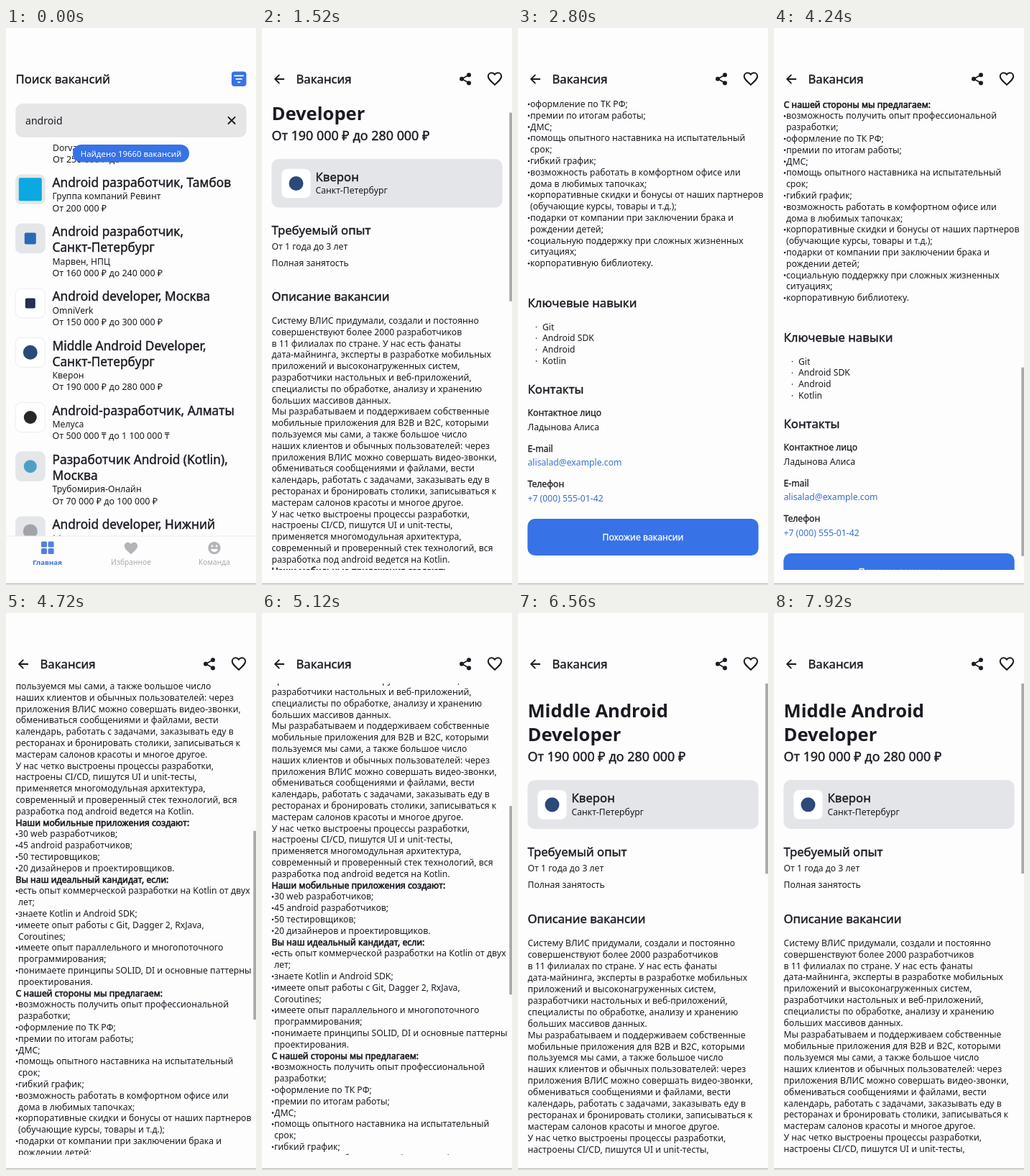
An HTML page for the animation above (8 s loop, 348x774 px).

```html
<!DOCTYPE html>
<html lang="ru">
<head>
<meta charset="utf-8">
<title>Поиск вакансий</title>
<style>
  html, body { margin: 0; width: 100%; height: 100%; overflow: hidden; background: #fdfdfd; }
  svg { display: block; width: 100vw; height: 100vh; }
  text { font: 400 12.2px "Noto Sans", "Open Sans", sans-serif; fill: #1a1b22; white-space: pre; }
  /* a thin outline gives the medium weight */
  .h, .pay, .label, .strong { stroke: #1a1b22; stroke-width: .4px; }
  .h { font-size: 16.7px; }
  .item { font-size: 17.3px; }
  .title { font-size: 25.6px; font-weight: 600; }
  .pay { font-size: 17.9px; }
  .sum { font-size: 12.5px; }
  .label { stroke-width: .3px; }
  .strong { stroke-width: .6px; }
  .link { fill: #3a6fd2; }
  .query { font-size: 14.1px; }
  .toast { font-size: 11.4px; fill: #fff; }
  .button { fill: #fff; stroke: #fff; stroke-width: .3px; }
  .tab { font-size: 10.2px; fill: #a9abb0; }
  .tab.on { font-size: 9.6px; font-weight: 600; fill: #3772e7; }
  .mid { text-anchor: middle; }
</style>
</head>
<body>
<svg id="stage" viewBox="0 0 348 774"></svg>
<script>
const INK = '#1a1b22', BLUE = '#3772e7', PAPER = '#fdfdfd', GREY = '#b4b5b9';
const LOOP = 8000, STEP = 80;
const TOP = 98, VIEW = 655, MAX_SCROLL = 982, LINE = 15.8;

const text = (x, y, str, cls = '') => `<text x="${x}" y="${y}" class="${cls}">${str}</text>`;
const box = (x, y, w, h, r, fill, extra = '') =>
  `<rect x="${x}" y="${y}" width="${w}" height="${h}" rx="${r}" fill="${fill}" ${extra}/>`;
const dot = (x, y, r, fill) => `<circle cx="${x}" cy="${y}" r="${r}" fill="${fill}"/>`;
const stroke = (d, width, color = INK) =>
  `<path d="${d}" fill="none" stroke="${color}" stroke-width="${width}"/>`;
const heart = (x, y, attrs) => `<path transform="translate(${x} ${y})" ${attrs}
  d="M0 8.3C-6 3-9.2.2-9.2-3.3C-9.2-6.2-7-8.3-4.4-8.3C-2.6-8.3-1-7.4 0-6C1-7.4 2.6-8.3 4.4-8.3C7-8.3 9.2-6.2 9.2-3.3C9.2.2 6 3 0 8.3Z"/>`;

// Vacancy list: tile colour, mark shape, mark colour, mark size, title lines, company, salary
const rows = [
  ['#e5e6ea', 'square', '#0ba9df', 32, ['Android разработчик, Тамбов'], 'Группа компаний Ревинт', 'От 200 000 ₽'],
  ['#e5e6ea', 'square', '#2b69b5', 16, ['Android разработчик,', 'Санкт-Петербург'], 'Марвен, НПЦ', 'От 160 000 ₽ до 240 000 ₽'],
  ['#fff', 'square', '#252f52', 14, ['Android developer, Москва'], 'OmniVerk', 'От 150 000 ₽ до 300 000 ₽'],
  ['#fff', 'circle', '#2b4a78', 20, ['Middle Android Developer,', 'Санкт-Петербург'], 'Кверон', 'От 190 000 ₽ до 280 000 ₽'],
  ['#fff', 'circle', '#26272b', 18, ['Android-разработчик, Алматы'], 'Мелуса', 'От 500 000 ₸ до 1 100 000 ₸'],
  ['#e5e6ea', 'circle', '#4f9fc4', 18, ['Разработчик Android (Kotlin),', 'Москва'], 'Трубомирия-Онлайн', 'От 70 000 ₽ до 100 000 ₽'],
  ['#e5e6ea', 'circle', '#a2a3a7', 20, ['Android developer, Нижний', 'Новгород'], '', '']
];

function tile(x, y, fill, shape, color, size) {
  const inset = 20.5 - size / 2;
  return box(x, y, 41, 41, 8, fill, 'stroke="#e6e7ea" stroke-width=".8"') +
    box(x + inset, y + inset, size, size, shape === 'circle' ? size / 2 : 2, color);
}

function vacancyList() {
  let y = 221, out = text(65, 170.5, 'Dorva') + text(65, 186.5, 'От 250 000 ₽ до', 'sum');
  for (const [fill, shape, color, size, lines, company, pay] of rows) {
    out += tile(13.3, y - 17.3, fill, shape, color, size);
    lines.forEach((line, i) => out += text(64.5, y + i * 22, line, 'h item'));
    const end = y + (lines.length - 1) * 22;
    out += text(64.5, end + 17.3, company) + text(64.5, end + 33.5, pay, 'sum');
    y = end + 68.2;
  }
  return out;
}

function tabs() {
  const grid = [[49, 713.5], [58.6, 713.5], [49, 723], [58.6, 723]]
    .map(([x, y]) => box(x, y, 8, 8, 1.5, '#527fdf')).join('');
  const smile = dot(290, 722.5, 8.7, GREY) + dot(287, 720, 1.4, PAPER) + dot(293, 720, 1.4, PAPER) +
    `<path d="M285 724H295C294 729.5 286 729.5 285 724Z" fill="${PAPER}"/>`;
  return box(0, 706, 348, 66, 0, PAPER) + box(0, 705.5, 348, 1, 0, '#ebecee') + grid +
    heart(174, 723, `fill="${GREY}"`) + smile +
    text(57.5, 746, 'Главная', 'tab on mid') + text(174, 746, 'Избранное', 'tab mid') +
    text(290, 746, 'Команда', 'tab mid');
}

const searchScreen = () =>
  text(13.5, 77, 'Поиск вакансий', 'h') + box(314, 60.5, 20.5, 20.5, 4, BLUE) +
  stroke('M317.5 66.3H331M319.8 70.8H328.7M322.3 75.3H326.2', 1.8, '#fff') +
  `<g clip-path="url(#listArea)">${vacancyList()}</g>` +
  box(13.3, 105, 321.4, 47, 10, '#e6e6e7') + text(27, 133.5, 'android', 'query') +
  stroke('M309 123.3L319.2 133.5M319.2 123.3L309 133.5', 1.9) +
  box(93, 162, 162, 24.5, 12, BLUE) + text(174, 178.7, 'Найдено 19660 вакансий', 'toast mid') +
  tabs();

// Leading mark: "*" bold line, "•" list item, "_" continuation of an item
const description = `Систему ВЛИС придумали, создали и постоянно
совершенствуют более 2000 разработчиков
в 11 филиалах по стране. У нас есть фанаты
дата-майнинга, эксперты в разработке мобильных
приложений и высоконагруженных систем,
разработчики настольных и веб-приложений,
специалисты по обработке, анализу и хранению
больших массивов данных.
Мы разрабатываем и поддерживаем собственные
мобильные приложения для B2B и B2C, которыми
пользуемся мы сами, а также большое число
наших клиентов и обычных пользователей: через
приложения ВЛИС можно совершать видео-звонки,
обмениваться сообщениями и файлами, вести
календарь, работать с задачами, заказывать еду в
ресторанах и бронировать столики, записываться к
мастерам салонов красоты и многое другое.
У нас четко выстроены процессы разработки,
настроены CI/CD, пишутся UI и unit-тесты,
применяется многомодульная архитектура,
современный и проверенный стек технологий, вся
разработка под android ведется на Kotlin.
*Наши мобильные приложения создают:
•30 web разработчиков;
•45 android разработчиков;
•50 тестировщиков;
•20 дизайнеров и проектировщиков.
*Вы наш идеальный кандидат, если:
•есть опыт коммерческой разработки на Kotlin от двух
_лет;
•знаете Kotlin и Android SDK;
•имеете опыт работы с Git, Dagger 2, RxJava,
_Coroutines;
•имеете опыт параллельного и многопоточного
_программирования;
•понимаете принципы SOLID, DI и основные паттерны
_проектирования.
*С нашей стороны мы предлагаем:
•возможность получить опыт профессиональной
_разработки;
•оформление по ТК РФ;
•премии по итогам работы;
•ДМС;
•помощь опытного наставника на испытательный
_срок;
•гибкий график;
•возможность работать в комфортном офисе или
_дома в любимых тапочках;
•корпоративные скидки и бонусы от наших партнеров
_(обучающие курсы, товары и т.д.);
•подарки от компании при заключении брака и
_рождении детей;
•социальную поддержку при сложных жизненных
_ситуациях;
•корпоративную библиотеку.`.split('\n');

function descriptionLine(line, i) {
  const y = 460 + i * LINE;
  if (line[0] === '*') return text(13.5, y, line.slice(1), 'strong');
  if (line[0] === '_') return text(17, y, line.slice(1));
  if (line[0] === '•') return dot(15, y - 4, 1.3, INK) + text(17, y, line.slice(1));
  return text(13.5, y, line);
}

const skill = (name, i) => dot(25.5, 1397.5 + i * LINE, .8, INK) + text(34, 1401.5 + i * LINE, name);

const vacancy = () =>
  text(13.5, 144.3, 'Middle Android', 'title') + text(13.5, 177, 'Developer', 'title') +
  text(13.5, 205.3, 'От 190 000 ₽ до 280 000 ₽', 'pay') +
  box(13.3, 231, 321.4, 67.5, 10, '#e4e5e9') + tile(27, 244.5, '#fff', 'circle', '#2b4a78', 20) +
  text(74.5, 262, 'Кверон', 'h') + text(74.5, 279.3, 'Санкт-Петербург') +
  text(13.5, 336, 'Требуемый опыт', 'h') + text(13.5, 357.2, 'От 1 года до 3 лет') +
  text(13.5, 380, 'Полная занятость') + text(13.5, 428.3, 'Описание вакансии', 'h') +
  description.map(descriptionLine).join('') +
  text(13.5, 1370.3, 'Ключевые навыки', 'h') +
  ['Git', 'Android SDK', 'Android', 'Kotlin'].map(skill).join('') +
  text(13.5, 1490, 'Контакты', 'h') +
  text(13.5, 1521.3, 'Контактное лицо', 'label') + text(13.5, 1541, 'Ладынова Алиса') +
  text(13.5, 1570.6, 'E-mail', 'label') + text(13.5, 1590.4, 'alisalad@example.com', 'link') +
  text(13.5, 1620.2, 'Телефон', 'label') + text(13.5, 1639.8, '+7 (000) 555-01-42', 'link') +
  box(13.3, 1664, 321.4, 51, 10, BLUE) + text(174, 1693.8, 'Похожие вакансии', 'button mid');

const header = () =>
  stroke('M31 71H18.5M24.3 64.8L18.1 71L24.3 77.2', 1.8) + text(47.5, 77, 'Вакансия', 'h') +
  stroke('M288 65.3L278 70.7L288 76.3', 1.7) +
  dot(288, 65.2, 3, INK) + dot(278, 70.7, 3, INK) + dot(288, 76.4, 3, INK) +
  heart(324, 70.6, `fill="none" stroke="${INK}" stroke-width="2"`);

const thumbHeight = VIEW * VIEW / (VIEW + MAX_SCROLL);

document.getElementById('stage').innerHTML = `
  <clipPath id="listArea"><rect y="152" width="348" height="554"/></clipPath>
  <clipPath id="pageArea"><rect y="${TOP}" width="348" height="${VIEW}"/></clipPath>
  ${box(0, 0, 348, 774, 0, PAPER)}
  <g id="search">${searchScreen()}</g>
  <g id="detail">
    ${box(0, 0, 348, 774, 0, PAPER)}
    ${header()}
    <g clip-path="url(#pageArea)"><g id="stretch">
      <g id="page">${vacancy()}</g>
      <rect id="thumb" x="344.3" y="${TOP}" width="3.7" height="${thumbHeight}" fill="#a9a9aa"/>
    </g></g>
  </g>
  ${box(0, 772, 348, 1, 0, '#a3a3a4')}`;

// Motion tables: [time in ms, value]
const fade = [[0, 0], [80, .06], [160, .2], [400, .92], [480, 1]];
const scroll = [
  [1440, 0], [1520, 49], [1600, 190], [1760, 460], [1920, 680], [2080, 850], [2240, 960], [2320, 982],
  [4160, 982], [4240, 934], [4400, 745], [4560, 605], [4720, 512], [4880, 455], [5040, 428], [5120, 425],
  [5200, 425], [5280, 424], [5360, 424], [5440, 398], [5520, 325], [5680, 185], [5840, 78], [6000, 14], [6080, 0]
];
const overscroll = [
  [6000, 0], [6160, .014], [6320, .013], [6560, .0086], [6880, 0],
  [7280, 0], [7360, .001], [7440, .001], [7920, .0075]
];
const thumbAlpha = [
  [2480, 1], [2800, 0], [4160, 0], [4240, 1], [6880, 1], [7200, 0], [7280, 0], [7360, 1]
];

function at(track, t) {
  const i = track.findIndex(([time]) => time > t);
  if (i < 0) return track[track.length - 1][1];
  if (i === 0) return track[0][1];
  const [t0, a] = track[i - 1], [t1, b] = track[i];
  return a + (b - a) * (t - t0) / (t1 - t0);
}

const [search, detail, stretch, page, thumb] =
  ['search', 'detail', 'stretch', 'page', 'thumb'].map(id => document.getElementById(id));

function draw(time) {
  const t = Math.floor(time % LOOP / STEP) * STEP;
  const shown = at(fade, t), y = at(scroll, t), scale = 1 + at(overscroll, t);
  search.setAttribute('visibility', shown < 1 ? 'visible' : 'hidden');
  detail.setAttribute('opacity', shown);
  page.setAttribute('transform', `translate(0 ${-y})`);
  thumb.setAttribute('transform', `translate(0 ${y / MAX_SCROLL * (VIEW - thumbHeight)})`);
  thumb.setAttribute('opacity', at(thumbAlpha, t));
  stretch.setAttribute('transform', `translate(0 ${TOP}) scale(1 ${scale}) translate(0 ${-TOP})`);
}

const start = performance.now();
function tick() {
  draw(performance.now() - start);
  requestAnimationFrame(tick);
}
tick();
</script>
</body>
</html>
```
